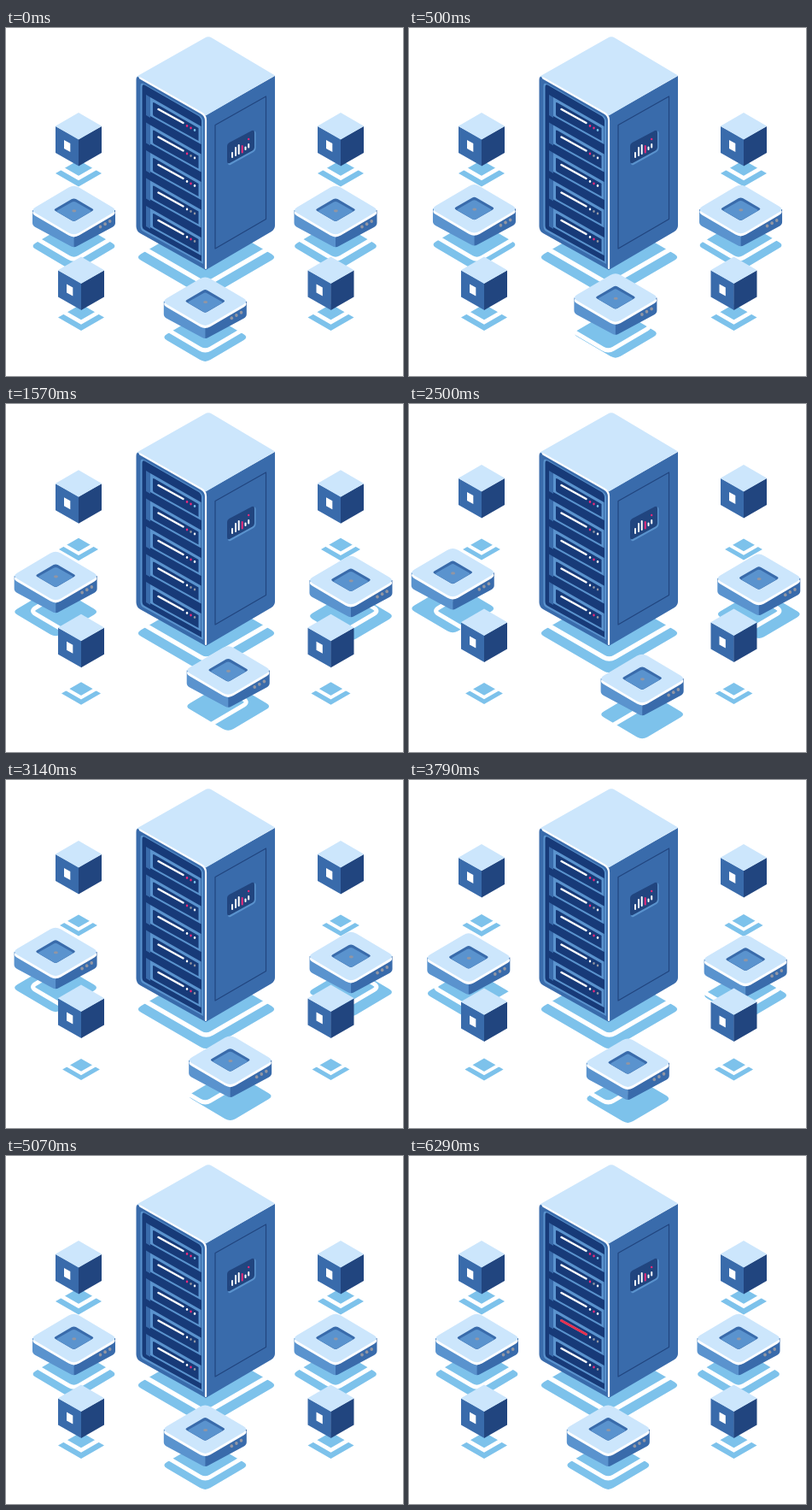
Recreate the animation shown at these times as an HTML page. Size 465 px wide and 407 px high, loop 7210 ms.

```html
<!DOCTYPE html>
<html lang="en">
<head>
<meta charset="utf-8">
<title>Server room</title>
<style>
html, body { margin: 0; width: 100%; height: 100%; overflow: hidden; background: #fff; }
svg { display: block; width: 465px; height: 407px; }
</style>
</head>
<body>
<svg id="stage" viewBox="0 0 465 407" xmlns="http://www.w3.org/2000/svg"></svg>
<script>
(() => {
const LOOP = 7210, FPS = 14;
const C = {
  pale: '#cce6fc', sky: '#7dc2eb', light: '#5a93ce', mid: '#396bab',
  deep: '#21457f', navy: '#173a78', pink: '#ee2a7b', red: '#e6304f', gray: '#9296a3', white: '#fff'
};
const stage = document.getElementById('stage');

function add(parent, tag, attrs) {
  const el = document.createElementNS('http://www.w3.org/2000/svg', tag);
  for (const k in attrs) el.setAttribute(k, attrs[k]);
  return parent.appendChild(el);
}
const group = parent => add(parent, 'g', {});
const shape = (parent, d, fill) => add(parent, 'path', { d, fill });
const line = (parent, d, stroke, width) => add(parent, 'path', {
  d, stroke, 'stroke-width': width, fill: 'none', 'stroke-linecap': 'round', 'stroke-linejoin': 'round'
});
const dot = (parent, cx, cy, r, fill) => add(parent, 'ellipse', { cx, cy, rx: r * .9, ry: r, fill });
const move = (el, x, y, s = 1) => el.setAttribute('transform', `translate(${x} ${y}) scale(${s})`);

// Diamond whose corners are rounded over the share c of each side
function diamond(x, y, w, h, c = 0) {
  const p = [[0, -h], [w, 0], [0, h], [-w, 0]];
  const at = (a, b) => `${x + a[0] + (b[0] - a[0]) * c} ${y + a[1] + (b[1] - a[1]) * c}`;
  return p.map((q, i) =>
    `${i ? 'L' : 'M'}${at(q, p[(i + 3) % 4])}Q${x + q[0]} ${y + q[1]} ${at(q, p[(i + 1) % 4])}`).join('') + 'Z';
}
function ring(parent, d, width) {
  add(parent, 'path', { d, fill: 'none', stroke: C.white, 'stroke-width': width });
}

const floor = group(stage), rack = group(stage), upper = group(stage);

// Server
let redBar;
function drawServer() {
  shape(floor, diamond(234.5, 268, 83, 48, .08), C.sky);
  ring(floor, diamond(234.5, 252, 83, 48, .08), 5.5);

  shape(rack, 'M234 102L315 56V231Q315 235 311 238L234 283Z', C.mid);
  shape(rack, 'M152.5 61Q152.5 55 157 57L234 102V283L157 240Q152.5 237 152.5 232Z', C.mid);
  shape(rack, 'M155 57.5Q153 56.5 156 55L233 11.5Q237 9 241 11.5L315 55.5L234 102.5Z', C.pale);
  line(rack, 'M157 58.5L229 99.5Q234 102.5 234 108V281', C.white, 2.2);
  shape(rack, 'M157.5 68Q157.5 63 162 65.5L227 102.5Q231 105 231 110V276L161 238Q157.5 236 157.5 232Z', C.light);
  shape(rack, 'M159.5 69Q159.5 65 163 67L225 102.5Q229 105 229 109V273L163 236.5Q159.5 235 159.5 231Z', C.navy);

  const lamps = [
    [C.pink, C.pink, C.sky], [C.pink, C.gray, C.white], [C.white, C.pink, C.white],
    [C.white, C.gray, C.gray], [C.white, C.pink, C.gray]
  ];
  lamps.forEach((row, i) => {
    const g = group(rack);
    move(g, 0, i * 32.5);
    shape(g, 'M164 78L169 81V105L164 102Z', C.mid);
    shape(g, 'M169 81L228.5 115V136L169 103Z', C.light);
    shape(g, 'M172 88Q172 86.5 174 87.5L225.5 117V132L174 103.5Q172 102.5 172 101Z', C.navy);
    const bar = 'M178.5 95L207.5 111';
    line(g, bar, C.white, 2.5);
    if (i === 3) {
      redBar = line(g, bar, C.red, 2.9);
      redBar.setAttribute('pathLength', 1);
    }
    row.forEach((c, k) => dot(g, 212 + k * 4.5, 114.5 + k * 2.5, 1.4, c));
  });

  line(rack, 'M245 113.5L304.5 80V223.5L245 258Z', C.deep, 1.2);
  shape(rack, 'M260 139Q260 136.5 262.5 135L289 121Q292.5 119.5 292.5 123V141Q292.5 143.5 290 145L263 160Q260 161 260 158Z', C.light);
  shape(rack, 'M259 138Q259 135.5 261.5 134L288 120Q291 119 291 122V139.5Q291 142 288.5 143.5L262 158Q259 159 259 156Z', C.deep);
  const bars = [[265, 146, 151], [269, 140, 149], [272.7, 137, 147], [276.7, 138, 145.5],
    [280.5, 139.5, 142], [284.2, 136, 139.5]];
  bars.forEach(([x, a, b], i) => line(rack, `M${x} ${a}V${b}`, i === 3 ? C.pink : C.white, 2));
  dot(rack, 284.2, 130, 1.3, C.pink);
}

// Flat device: the floor ring stays, the shadow and the body travel
function makeDevice(x, y) {
  const shadow = group(floor), body = group(upper);
  shape(shadow, diamond(0, 42, 51, 30, .12), C.sky);
  ring(floor, diamond(x, y + 29, 51, 30, .12), 5);

  shape(body, 'M-48.5 0V15Q-48.5 18 -45 20L-4 42Q-2 43.3 .3 43.3V0Z', C.light);
  shape(body, 'M48.5 0V15Q48.5 18 45 20L4 42Q2 43.3 0 43.3V0Z', C.mid);
  shape(body, diamond(0, 3.2, 51.3, 30, .12), C.white);
  shape(body, diamond(0, 0, 51, 30, .12), C.pale);
  shape(body, diamond(0, -.3, 24, 14, .1), C.mid);
  shape(body, diamond(0, 1.3, 21, 12, .1), C.light);
  add(body, 'ellipse', { cx: .3, cy: .8, rx: 2.5, ry: 1.6, fill: C.gray });
  for (let i = 0; i < 3; i++) dot(body, 31 + i * 5.6, 19.5 - i * 3.2, 2, C.gray);

  return (dx, dy) => [shadow, body].forEach(el => move(el, x + dx, y + dy));
}

// Floating cube; its shadow shrinks as it rises
function makeCube(x, y) {
  const shadow = group(floor), body = group(upper);
  shape(shadow, diamond(0, 0, 27, 15.5), C.sky);
  ring(shadow, diamond(0, -10, 27, 15.5), 4.7);
  shape(body, 'M-27 16L.3 31V62.5L-27 47Z', C.mid);
  shape(body, 'M27 16L0 31V62.5L27 47Z', C.deep);
  shape(body, diamond(0, 15.7, 27.2, 15.7), C.pale);
  shape(body, 'M-17 32L-9.7 36V46L-17 42Z', C.white);
  return e => {
    move(body, x, y - 28 * e);
    move(shadow, x, y + 71, 1 - .19 * e);
  };
}

drawServer();
const left = makeDevice(79.5, 213), right = makeDevice(386, 213), front = makeDevice(233.3, 319.7);
const cubes = [[85, 99], [392, 99], [88, 267.5], [380.5, 267.5]].map(p => makeCube(...p));

const sine = p => (1 - Math.cos(Math.PI * p)) / 2;
function bezier(x1, x2) {
  return p => {
    let a = 0, b = 1;
    for (let i = 0; i < 24; i++) {
      const s = (a + b) / 2, r = 1 - s;
      if (3 * r * r * s * x1 + 3 * r * s * s * x2 + s * s * s < p) a = s; else b = s;
    }
    return a * a * (3 - 2 * a);
  };
}
const rise = bezier(.4, .2), sink = bezier(.7, .7);
const span = (t, a, b) => Math.min(1, Math.max(0, (t - a) / (b - a)));

// Time, x, y of the front device's corners
const route = [[0, 0, 0], [1180, 22.5, -11.2], [2360, 40.3, 1], [3640, 24, 11.5], [4750, 0, 0]];
function along(t) {
  let x = 0, y = 0;
  for (let i = 1; i < route.length; i++) {
    const [t0, x0, y0] = route[i - 1], [t1, x1, y1] = route[i];
    const e = sine(span(t, t0, t1));
    x += (x1 - x0) * e;
    y += (y1 - y0) * e;
  }
  return [x, y];
}

function draw(t) {
  const e = sine(span(t, 0, 2360)) - sine(span(t, 2360, 4720));
  left(-28.5 * e, -16 * e);
  right(24 * e, -9.3 * e);
  front(...along(t));
  const lift = rise(span(t, 786, 2357)) - sink(span(t, 3143, 4786));
  cubes.forEach(c => c(lift));
  const fill = sine(span(t, 5500, 6286));
  redBar.setAttribute('stroke-dasharray', `${fill} 2`);
  redBar.setAttribute('visibility', fill > 0 ? 'visible' : 'hidden');
}

const start = performance.now();
function tick() {
  const t = (performance.now() - start) % LOOP;
  draw(Math.floor(t * FPS / 1000 + .03) * 1000 / FPS);
  requestAnimationFrame(tick);
}
tick();
})();
</script>
</body>
</html>
```
